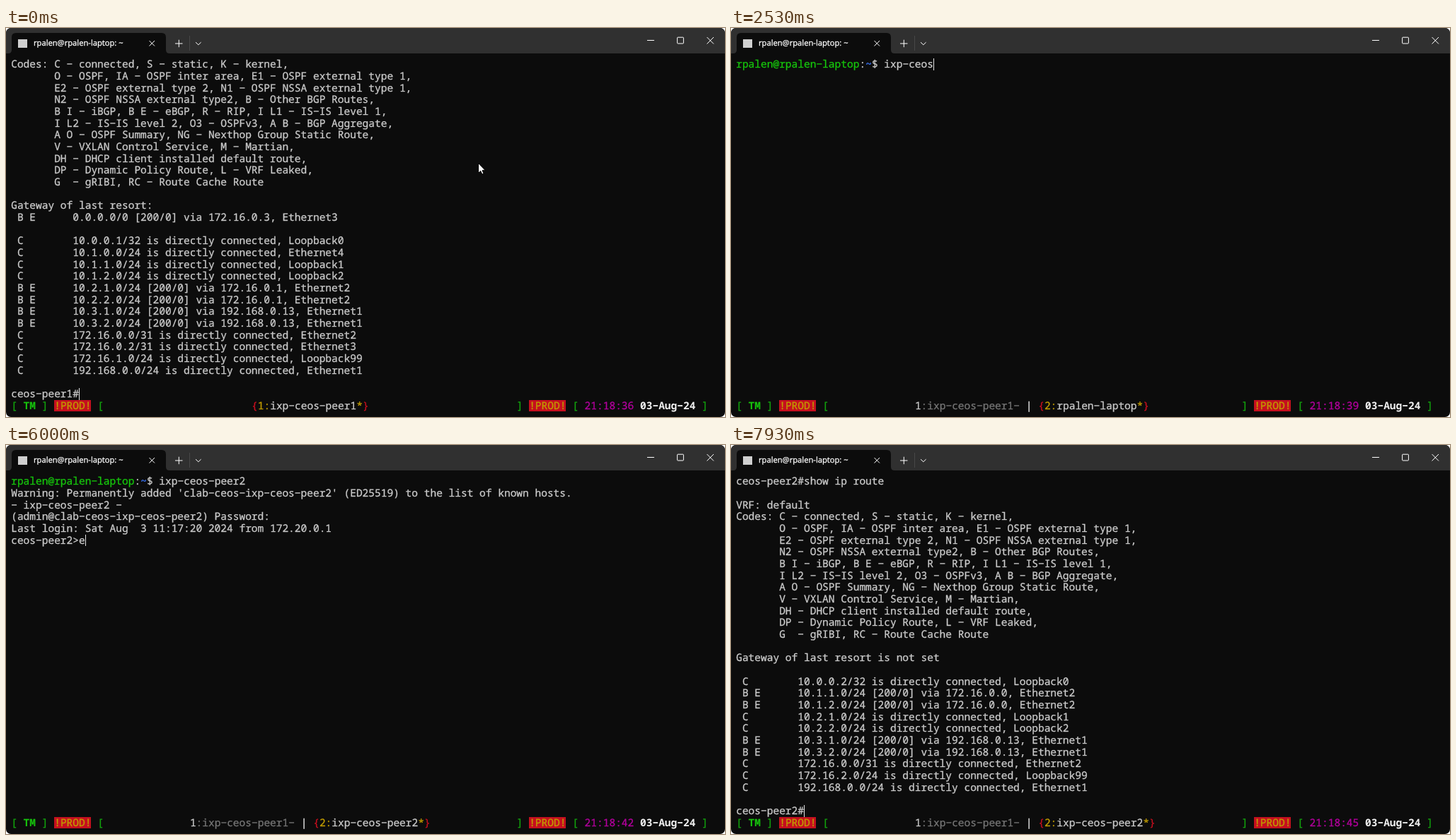
An HTML page that plays this animation: 1016 by 551 pixels, repeating every 8 s.

```html
<!DOCTYPE html>
<html lang="en">
<head>
<meta charset="utf-8">
<title>Terminal</title>
<style>
  html, body { margin: 0; width: 100%; height: 100%; overflow: hidden; background: #fff; }
  #win { position: absolute; left: 0; top: 0; width: 1016px; height: 551px;
    overflow: hidden; border-radius: 7px; background: #0c0c0c; }
  #chrome { position: absolute; left: 0; top: 0; }
  #title { position: absolute; left: 39px; top: 14px; color: #fff; white-space: pre;
    font: 11.2px/16px "Open Sans", "Noto Sans", sans-serif;
    -webkit-text-stroke: 0.3px; text-rendering: geometricPrecision; }
  #screen { position: absolute; left: 7.2px; top: 43.4px; color: #ccc;
    font: 14.523px/17.667px "Noto Sans Mono", "DejaVu Sans Mono", monospace;
    -webkit-text-stroke: 0.3px; font-variant-ligatures: none; text-rendering: geometricPrecision; }
  #screen span { position: absolute; display: block; white-space: pre; height: 16.667px; }
  #screen .caret { width: 1px; background: #e4e4e4; }
  .green { color: #13a10e; }
  .lime { color: #16c60c; }
  .bold { font-weight: 700; -webkit-text-stroke: 0; }
  .blue { color: #3b78ff; }
  .red { color: #c50f1f; }
  .gold { color: #c19c00; }
  .grey { color: #767676; }
  .pink { color: #b4009e; }
  .white { color: #f2f2f2; }
  .prod { color: #c19c00; background: #c50f1f; }
  #mouse { position: absolute; left: 666px; top: 190px; }
</style>
</head>
<body>
<div id="win">
  <svg id="chrome" width="1016" height="37" fill="none" stroke="#fff">
    <path d="M0 0H1016V36H0Z" fill="#303030" stroke="none"/>
    <path d="M3 36Q8 36 8 31V13Q8 7 14 7H220Q226 7 226 13V31Q226 36 231 36V37H3Z" fill="#0c0c0c" stroke="none"/>
    <rect x="17" y="16" width="13" height="12" fill="#d0d0d0" stroke="none"/>
    <path d="M202.5 18l7.5 7.5M210 18l-7.5 7.5"/>
    <path d="M239 22h10.5M244.3 16.7v10.5"/>
    <path d="M259.5 11v21" stroke="#474747"/>
    <path d="M268 20.2l3.8 3.6l3.8-3.6"/>
    <path d="M906 17.5h10"/>
    <rect x="948.6" y="13.2" width="8.8" height="8.8" rx="0.8"/>
    <path d="M990.5 13l9.5 9.5M1000 13l-9.5 9.5"/>
  </svg>
  <div id="title"></div>
  <div id="screen"></div>
  <svg id="mouse" width="13" height="19">
    <path d="M1.5 1.5V15.5L4.7 12.5L6.8 17.2L9 16.2L7 11.7H11.2Z" fill="#fff" stroke="#000"/>
  </svg>
</div>
<script>
const LOOP = 8000, CELL = 8.714, ROW = 16.667;
const USER = 'rpalen', HOST = USER + '-laptop';
const screen = document.getElementById('screen');
const mouse = document.getElementById('mouse');
document.getElementById('title').textContent = `${USER}@${HOST}: ~`;

const linked = (net, port) => ` C        ${net} is directly connected, ${port}`;
const learned = (net, hop, port) => ` B E      ${net} [200/0] via ${hop}, ${port}`;

const codes = [
  'C - connected, S - static, K - kernel,',
  'O - OSPF, IA - OSPF inter area, E1 - OSPF external type 1,',
  'E2 - OSPF external type 2, N1 - OSPF NSSA external type 1,',
  'N2 - OSPF NSSA external type2, B - Other BGP Routes,',
  'B I - iBGP, B E - eBGP, R - RIP, I L1 - IS-IS level 1,',
  'I L2 - IS-IS level 2, O3 - OSPFv3, A B - BGP Aggregate,',
  'A O - OSPF Summary, NG - Nexthop Group Static Route,',
  'V - VXLAN Control Service, M - Martian,',
  'DH - DHCP client installed default route,',
  'DP - Dynamic Policy Route, L - VRF Leaked,',
  'G  - gRIBI, RC - Route Cache Route'
].map((s, i) => (i ? '       ' : 'Codes: ') + s);

const peer1 = [
  ...codes, '',
  'Gateway of last resort:',
  learned('0.0.0.0/0', '172.16.0.3', 'Ethernet3'), '',
  linked('10.0.0.1/32', 'Loopback0'),
  linked('10.1.0.0/24', 'Ethernet4'),
  linked('10.1.1.0/24', 'Loopback1'),
  linked('10.1.2.0/24', 'Loopback2'),
  learned('10.2.1.0/24', '172.16.0.1', 'Ethernet2'),
  learned('10.2.2.0/24', '172.16.0.1', 'Ethernet2'),
  learned('10.3.1.0/24', '192.168.0.13', 'Ethernet1'),
  learned('10.3.2.0/24', '192.168.0.13', 'Ethernet1'),
  linked('172.16.0.0/31', 'Ethernet2'),
  linked('172.16.0.2/31', 'Ethernet3'),
  linked('172.16.1.0/24', 'Loopback99'),
  linked('192.168.0.0/24', 'Ethernet1'), '',
  'ceos-peer1#'
];

const peer2 = [
  'ceos-peer2#show ip route', '',
  'VRF: default',
  ...codes, '',
  'Gateway of last resort is not set', '',
  linked('10.0.0.2/32', 'Loopback0'),
  learned('10.1.1.0/24', '172.16.0.0', 'Ethernet2'),
  learned('10.1.2.0/24', '172.16.0.0', 'Ethernet2'),
  linked('10.2.1.0/24', 'Loopback1'),
  linked('10.2.2.0/24', 'Loopback2'),
  learned('10.3.1.0/24', '192.168.0.13', 'Ethernet1'),
  learned('10.3.2.0/24', '192.168.0.13', 'Ethernet1'),
  linked('172.16.0.0/31', 'Ethernet2'),
  linked('172.16.2.0/24', 'Loopback99'),
  linked('192.168.0.0/24', 'Ethernet1'), '',
  'ceos-peer2#'
];

// Key press times in ms, one per character
const keys = {
  'ixp-ceos-peer2': [1530, 1600, 1730, 1870, 2070, 2200, 2330, 2530, 2670, 2870, 2930, 3070, 3200, 3470],
  'en': [6000, 6130],
  'show ip route': [6670, 6730, 6870, 6930, 7000, 7130, 7200, 7270, 7400, 7470, 7530, 7600, 7670]
};
const ticks = [400, 1400, 2400, 3400, 4400, 5400, 6330, 7400, 7930];

const passed = (times, t) => times.filter(x => x <= t).length;
const typed = (text, t) => text.slice(0, passed(keys[text], t));

function session(t) {
  if (t < 670) return peer1;
  if (t < 730) return [''];
  if (t >= 7930) return peer2;
  const lines = [`${USER}@${HOST}:~$ ` + typed('ixp-ceos-peer2', t)];
  if (t >= 3670) lines.push('');
  if (t >= 3730) {
    lines[1] = "Warning: Permanently added 'clab-ceos-ixp-ceos-peer2' (ED25519) to the list of known hosts.";
    lines.push('- ixp-ceos-peer2 -', '(admin@clab-ceos-ixp-ceos-peer2) Password: ');
  }
  if (t >= 5470) lines.push('Last login: Sat Aug  3 11:17:20 2024 from 172.20.0.1', 'ceos-peer2>' + typed('en', t));
  if (t >= 6330) lines.push('ceos-peer2#' + typed('show ip route', t));
  if (t >= 7870) lines.push('');
  return lines;
}

function put(col, row, text, cls = '') {
  const el = document.createElement('span');
  el.className = cls;
  // The terminal face has a wide hyphen, as wide as a minus sign
  el.textContent = text.replace(/-/g, '\u2212');
  el.style.left = col * CELL + 'px';
  el.style.top = row * ROW + 'px';
  screen.append(el);
}

// Adjacent coloured pieces: text, class, text, class, ...
function run(col, row, ...parts) {
  for (let i = 0; i < parts.length; i += 2) {
    put(col, row, parts[i], parts[i + 1]);
    col += parts[i].length;
  }
}

function status(t) {
  const row = 29;
  const active = (n, name) => ['{', 'red', n + ':', 'gold', name, '', '*', 'gold', '}', 'red'];
  run(0, row, '[', 'green', ' TM ', 'lime bold', ']', 'green');
  put(7, row, '!PROD!', 'prod');
  put(14, row, '[', 'green');
  if (t < 670) run(39, row, ...active(1, 'ixp-ceos-peer1'));
  else {
    const name = t < 730 ? 'bash' : t < 3730 ? HOST : 'ixp-ceos-peer2';
    run(t < 730 ? 34 : 29, row, '1', '', ':ixp-ceos-peer1-', 'grey', ' | ', 'white', ...active(2, name));
  }
  put(82, row, ']', 'green');
  put(84, row, '!PROD!', 'prod');
  run(91, row, '[ ', 'green', '21:18:' + (36 + passed(ticks, t)), 'pink',
    ' 03-Aug-24', 'white bold', ' ]', 'green');
}

function draw(t) {
  screen.textContent = '';
  const lines = session(t);
  lines.forEach((text, row) => {
    if (text.startsWith(USER)) {
      const end = USER.length + HOST.length + 1;
      run(0, row, text.slice(0, end), 'lime', ':', '', '~', 'blue', text.slice(end + 2), '');
    } else if (text) put(0, row, text);
  });
  const last = lines.length - 1;
  put(lines[last].length, last, '', 'caret');
  status(t);
  mouse.style.display = t < 400 ? '' : 'none';
}

const steps = [...Object.values(keys).flat(), ...ticks, 670, 730, 3670, 3730, 5470, 7870];
const start = performance.now();
let shown = -1;
function tick() {
  const t = (performance.now() - start) % LOOP;
  const step = passed(steps, t);
  if (step !== shown) {
    shown = step;
    draw(t);
  }
  requestAnimationFrame(tick);
}
tick();
</script>
</body>
</html>
```
